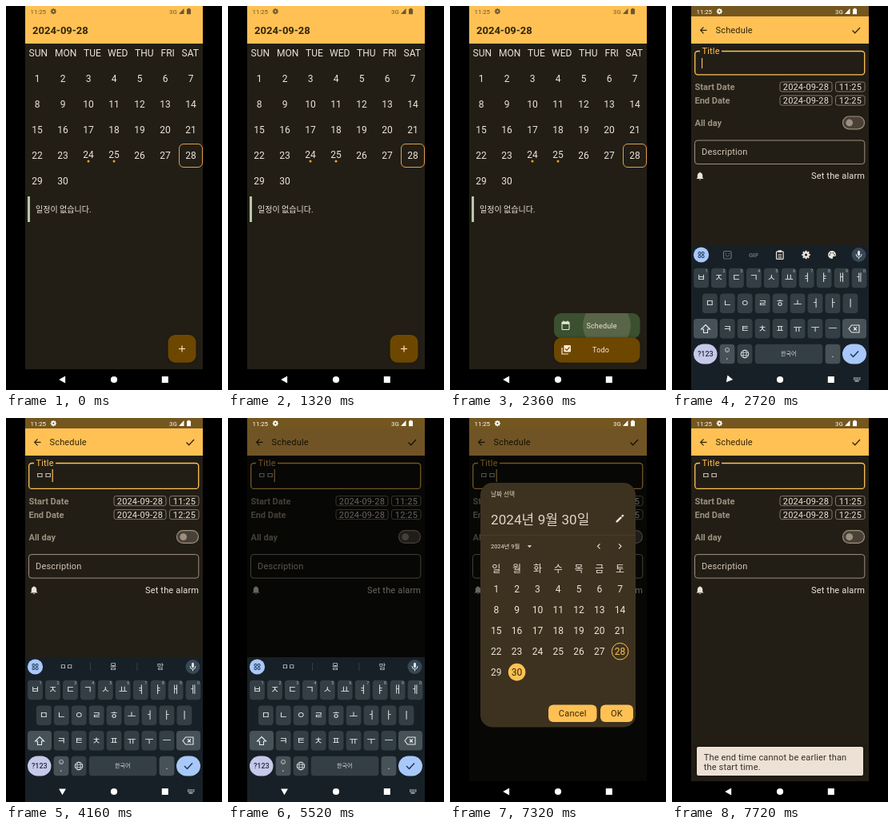
An HTML page with a canvas for the animation above (8 s loop, 270 px wide and 480 px high).

```html
<!DOCTYPE html>
<html lang="ko">
<head>
<meta charset="utf-8">
<title>Calendar</title>
<style>
html, body { margin: 0; width: 100%; height: 100%; overflow: hidden; background: #000; }
canvas { display: block; width: 270px; height: 480px; }
</style>
</head>
<body>
<canvas id="stage"></canvas>
<script>
const canvas = document.getElementById('stage');
const ctx = canvas.getContext('2d');
const dpr = window.devicePixelRatio || 1;
canvas.width = 270 * dpr;
canvas.height = 480 * dpr;

const LOOP = 8000;
const FONT = 'Roboto, "Noto Sans CJK KR", "Noto Sans CJK", sans-serif';
const AMBER = '#ffc154', INK = '#ece3da', DARK = '#33250a';
const MUTED = '#9c9080', BROWN = '#6d4700', GREEN = '#3b502e';
const KEYBED = '#172026', KEY = '#343f45', KEY_ALT = '#465158';

const clamp = v => Math.max(0, Math.min(1, v));
const lerp = (a, b, p) => a + (b - a) * p;
const span = (t, a, b) => clamp((t - a) / (b - a));
const easeOut = p => 1 - (1 - p) ** 3;
const smooth = p => p * p * (3 - 2 * p);

// y is the optical middle of the line
function text(s, x, y, size, color = INK, { align = 'left', weight = 400, ls = 0 } = {}) {
  ctx.font = `${weight} ${size}px ${FONT}`;
  ctx.letterSpacing = ls + 'px';
  ctx.textAlign = align;
  ctx.fillStyle = color;
  ctx.fillText(s, x, y + size * 0.355);
}
const mid = (s, x, y, size, color, weight) => text(s, x, y, size, color, { align: 'center', weight });
const label = (s, x, y, color, opt) => text(s, x, y, 11, color, { ls: 0.17, ...opt });

function rect(x, y, w, h, color) {
  ctx.fillStyle = color;
  ctx.fillRect(x, y, w, h);
}
function round(x, y, w, h, r, fill, stroke, lw = 1) {
  ctx.beginPath();
  ctx.roundRect(x, y, w, h, r);
  paint(fill, stroke, lw);
}
function disc(x, y, r, fill, stroke, lw = 1) {
  ctx.beginPath();
  ctx.arc(x, y, r, 0, 7);
  paint(fill, stroke, lw);
}
function paint(fill, stroke, lw) {
  if (fill) { ctx.fillStyle = fill; ctx.fill(); }
  if (stroke) { ctx.strokeStyle = stroke; ctx.lineWidth = lw; ctx.stroke(); }
}
function shape(d, x, y, fill, stroke, lw = 1.2) {
  at(x, y, () => {
    const path = new Path2D(d);
    if (fill) { ctx.fillStyle = fill; ctx.fill(path); }
    if (stroke) { ctx.strokeStyle = stroke; ctx.lineWidth = lw; ctx.stroke(path); }
  });
}
function at(x, y, draw, alpha = 1) {
  ctx.save();
  ctx.translate(x, y);
  ctx.globalAlpha *= alpha;
  draw();
  ctx.restore();
}
const faded = (alpha, draw) => { if (alpha > 0) at(0, 0, draw, alpha); };
const dim = a => rect(24, 13, 222, 441, `rgba(0,0,0,${a})`);

// page colour sinks to black faster than the rest under a scrim
function ground(shade) {
  const k = clamp(1 - 5 * shade ** 4);
  return `rgb(${34 * k},${30 * k},${22 * k})`;
}

function gear(x, y, r, color, hole) {
  for (let i = 0; i < 8; i++) {
    const a = i * Math.PI / 4;
    ctx.beginPath();
    ctx.moveTo(x, y);
    ctx.lineTo(x + Math.cos(a) * r, y + Math.sin(a) * r);
    ctx.strokeStyle = color;
    ctx.lineWidth = r * 0.42;
    ctx.stroke();
  }
  disc(x, y, r * 0.72, color);
  disc(x, y, r * 0.3, hole);
}

function statusBar(bar, color) {
  rect(24, 0, 222, 13, bar);
  text('11:25', 30.5, 7, 7.8, color);
  gear(59.3, 6.7, 3.6, color, bar);
  text('3G', 204, 7, 7.8, color);
  shape('M0 7L6.5 0V7Z', 216, 3, color);
  shape('M0 1H1.4V0H3.6V1H5V7.5H0Z', 226, 2.8, color);
}

function navBar(turn, kb) {
  rect(24, 454, 222, 26, kb > 0.05 ? KEYBED : '#000');
  at(70.5, 467, () => {
    ctx.rotate(-turn * Math.PI / 2);
    shape('M-4.3 0L3.6 -4.4V4.4Z', 0, 0, '#fff');
  });
  disc(135, 467, 4.1, '#fff');
  rect(194.8, 463, 8, 8, '#fff');
  faded(kb, () => {
    for (let i = 0; i < 8; i++) rect(227 + i % 4 * 2.3, 464.3 + (i >> 2) * 2, 1.5, 1.2, '#d5dade');
    rect(228.5, 468.3, 5, 1.2, '#d5dade');
  });
}

function home(bg) {
  rect(24, 13, 222, 441, bg);
  rect(24, 13, 222, 34, AMBER);
  text('2024-09-28', 33, 30, 13, DARK, { weight: 700 });
  const xs = [28.5, 61, 97, 127, 161, 193.5, 219.5];
  'SUN MON TUE WED THU FRI SAT'.split(' ').forEach((d, i) => text(d, xs[i], 58.5, 12));
  for (let d = 1; d <= 30; d++) {
    const x = 39 + (d - 1) % 7 * 32, y = 91 + Math.floor((d - 1) / 7) * 32;
    const busy = d === 24 || d === 25;
    mid(d, x, y - (busy ? 1 : 0), 12);
    if (busy) disc(x, y + 7, 1.5, '#f5a52d');
  }
  round(216.5, 172.5, 29, 29, 5.5, null, '#e0a048');
  rect(27, 238, 3, 32, '#b8c8a6');
  text('일정이 없습니다.', 37, 254.5, 10);
}

function fabMenu(t) {
  const p = easeOut(span(t, 1360, 1960)), rise = p ** 3;
  const left = lerp(202.5, 130, p), w = 237.5 - left;
  const top = lerp(411, 384, rise), mainTop = lerp(411, 414.5, p);
  const show = span(t, 1360, 1900);
  const glow = Math.sin(Math.PI * span(t, 1340, 2000));
  const cx = lerp(232, 189.5, p);
  if (p > 0) {
    round(left, top, w, 31.5, 9, GREEN);
    if (t > 2160) {
      ctx.save();
      ctx.beginPath();
      ctx.roundRect(left, top, w, 31.5, 9);
      ctx.clip();
      disc(196, 399, 30 * easeOut(span(t, 2140, 2400)), 'rgba(240,210,200,.16)');
      ctx.restore();
    }
    const y = lerp(428, 399.5, rise);
    faded(show, () => text('Schedule', cx, y, 9, INK, { align: 'center', ls: 0.17 }));
    const c = '#e4ecd8';
    faded(clamp(show * 2), () => {
      round(left + 10, y - 4.4, 9, 9.4, 1, null, c, 1.1);
      rect(left + 10, y - 4.6, 9, 2.8, c);
      rect(left + 11.4, y - 6, 1.2, 2, c);
      rect(left + 16.4, y - 6, 1.2, 2, c);
    });
  }
  ctx.save();
  ctx.shadowColor = 'rgba(0,0,0,.4)';
  ctx.shadowBlur = 3;
  round(left, mainTop, w, 445.7 - mainTop, 9, BROWN);
  ctx.restore();
  round(left, mainTop, w, 445.7 - mainTop, 9, `rgba(255,175,50,${0.17 * glow})`);
  faded(1 - span(t, 1340, 1480), () => {
    rect(216, 427.9, 8, 1.2, '#ffdfb0');
    rect(219.4, 424.5, 1.2, 8, '#ffdfb0');
  });
  faded(show, () => text('Todo', cx - 1 + 5 * (1 - show), 430, 9, '#ffe9cc', { align: 'center', ls: 0.17 }));
  faded(span(t, 1640, 1960), () => {
    const x = left + 10;
    shape('M0 2.5V10.5H8', x, 424.5, null, '#ffe9cc', 1.2);
    round(x + 2.4, 424, 8.6, 8.6, 1, '#ffe9cc');
    shape('M0 2L2 4L5.5 0', x + 4, 426.3, null, BROWN, 1.2);
  });
}

function schedule(typed, cursor, bg) {
  const dy = typed ? 2.6 : 0;
  rect(24, 13, 222, 441, bg);
  rect(24, 13, 222, 34, AMBER);
  shape('M8.5 4H1M4.5 0L.7 4L4.5 8', 35, 26.3, null, DARK);
  label('Schedule', 54.5, 30, DARK);
  shape('M0 4L3.2 7.2L9.5 .5', 225.5, 26.5, null, DARK, 1.3);

  round(28.7, 56.5, 212, 29.3 + dy, 3.5, null, AMBER, 1.3);
  rect(35, 55, 27, 3, bg);
  label('Title', 37.5, 56, AMBER);
  text('ㅁ'.repeat(typed), 37.3, 72.5, 11);
  if (cursor) {
    if (typed) rect(37 + typed * 10.3, 64, 1.2, 16, AMBER);
    else rect(37, 65, 1.1, 13, AMBER);
  }

  at(0, dy, () => {
    const bold = { weight: 700, ls: 0 };
    [['Start Date', '11:25', 101], ['End Date', '12:25', 118]].forEach(([name, time, y]) => {
      label(name, 28.5, y, MUTED, bold);
      round(135, y - 6, 65, 12, 2.5, null, '#8d8273', 0.9);
      round(204.5, y - 6, 36.5, 12, 2.5, null, '#8d8273', 0.9);
      label('2024-09-28', 138.8, y, INK);
      label(time, 208.8, y, INK);
    });
    label('All day', 28.5, 146, MUTED, bold);
    round(213.5, 138, 27, 15.8, 8, '#4a4136', MUTED, 1.2);
    disc(221.7, 146, 4.4, MUTED);
    round(28.5, 168, 212.3, 29.5, 3.5, null, '#9c8f80', 1);
    label('Description', 37, 182.5, '#d3c5b5');
    shape('M0 8.5L1.3 7V4Q1.4 1.4 3.6 .9Q4.5 -.8 5.4 .9Q7.6 1.4 7.7 4V7L9 8.5ZM3.3 9.2H5.7Q4.5 11 3.3 9.2Z', 30.5, 207.5, INK);
    label('Set the alarm', 174, 212.5);
  });
}

function key(c, x, y, w, color = KEY) {
  round(x - w / 2, y - 12.3, w, 24.6, 4, color);
  if (c) mid(c, x, y, 12, '#e6eaed');
}

function toolbar(typed) {
  disc(36.5, 311, 9.6, '#a9c8fa');
  for (let i = 0; i < 4; i++) {
    round(33 + i % 2 * 4.2, 307.5 + (i >> 1) * 4.2, 2.8, 2.8, 0.8, null, '#17304f', 1);
  }
  disc(233.5, 311, 9, '#384754');
  round(232, 305.8, 3, 6.5, 1.5, '#dbe4ec');
  shape('M0 0Q0 4 3.5 4Q7 4 7 0M3.5 4V6.3', 230, 310, null, '#dbe4ec', 1);
  if (typed) {
    const words = typed === 1 ? ['ㅁ', '뭐', '무'] : ['ㅁㅁ', '몸', '맘'];
    words.forEach((s, i) => mid(s, 75.5 + i * 58.7, 311, 9, '#dfe5e9'));
    [105, 163.5].forEach(x => rect(x, 306, 0.8, 10, '#3c474e'));
    return;
  }
  const grey = '#65727a';
  round(64.5, 306.5, 9.5, 9.5, 1.5, null, grey, 1.2);
  shape('M0 0Q2.5 3 5 0', 66.8, 311.5, null, grey, 1);
  disc(67.5, 309.5, 0.8, grey);
  disc(71.3, 309.5, 0.8, grey);
  mid('GIF', 102, 311, 8, grey, 700);
  round(130.5, 306.8, 8.6, 9.6, 1, null, INK, 1.2);
  rect(132.6, 305.3, 4.4, 2.6, INK);
  [310, 312, 314].forEach(y => rect(132.5, y, 4.6, 0.9, INK));
  gear(167.5, 311, 5.2, INK, KEYBED);
  shape('M5 0A5 5 0 1 0 5 10Q6.5 10 6 8.3Q5.8 7 7.2 7H8.5Q10 7 10 5A5 5 0 0 0 5 0Z', 195, 306, INK);
  [[197, 311], [198.3, 308.7], [201.5, 308.7], [203.2, 311]].forEach(([x, y]) => disc(x, y, 0.8, KEYBED));
}

function keyboard(typed, pressed) {
  rect(24, 299, 222, 181, KEYBED);
  toolbar(typed);
  [...'ㅂㅈㄷㄱㅅㅛㅕㅑㅐㅔ'].forEach((c, i) => {
    const x = 36.5 + i * 21.95;
    key(c, x, 340, 18.8);
    mid((i + 1) % 10, x + 6.4, 331.5, 5.2, '#b5bec4');
  });
  [...'ㅁㄴㅇㄹㅎㅗㅓㅏㅣ'].forEach((c, i) => {
    key(c, 47.3 + i * 21.95, 371.7, 18.8, pressed && !i ? '#5c6a72' : KEY);
  });
  [...'ㅋㅌㅊㅍㅠㅜㅡ'].forEach((c, i) => key(c, 69.2 + i * 21.95, 403.3, 18.8));
  key('', 42, 403.3, 30, KEY_ALT);
  shape('M5.5 0L11 5.5H8V10H3V5.5H0Z', 36.5, 398.5, null, '#e6eaed', 1.1);
  key('', 228, 403.3, 30, KEY_ALT);
  shape('M3.5 0H13V9H3.5L0 4.5ZM6 2.5L10 6.5M10 2.5L6 6.5', 221, 399, null, '#e6eaed', 1.1);

  round(27, 422.5, 29.5, 25, 12.5, '#c6c9e8');
  mid('?123', 41.8, 435, 9, '#252b3d', 500);
  key('', 69, 435, 18.8, KEY_ALT);
  disc(69, 430, 2.6, null, '#c4ccd1', 0.8);
  shape('M0 0Q1.3 1.5 2.6 0', 67.7, 430.5, null, '#c4ccd1', 0.6);
  mid(',', 69, 437.5, 9, '#e6eaed');
  key('', 91, 435, 18.8);
  disc(91, 435, 4.8, null, '#e6eaed', 1);
  ctx.beginPath();
  ctx.ellipse(91, 435, 2.1, 4.8, 0, 0, 7);
  paint(null, '#e6eaed', 0.8);
  shape('M0 0H9M0 3.4H9', 86.5, 433.3, null, '#e6eaed', 0.7);
  key('', 146, 435, 84.5);
  mid('한국어', 145.7, 435, 7, '#d5dbdf');
  key('.', 201, 435, 18.8, KEY_ALT);
  round(213, 422.5, 30, 25, 12.5, '#a9c8fa');
  shape('M0 4L3.5 7.5L10 .5', 223, 431, null, '#17304f', 1.4);
}

function dialog(t) {
  const picked = t < 6560 ? 28 : 30;
  round(38, 81, 194, 305.5, 15, '#3d321f');
  text('날짜 선택', 51, 95.5, 7.7, '#e0d3c2');
  text(`2024년 9월 ${picked}일`, 51, 127, 17, '#e0d6c9', { ls: 0.1 });
  shape('M0 8.2V10H1.8L7.6 4.2L5.8 2.4ZM6.5 1.7L8.3 3.5L9.7 2.1Q10 1.7 9.7 1.3L8.7 .3Q8.3 0 7.9 .3Z', 207.5, 120.5, INK);
  rect(38, 146, 194, 0.7, '#4c412f');
  text('2024년 9월', 51, 160.5, 7.4, INK);
  shape('M0 0H5.4L2.7 2.7Z', 96.7, 159.2, INK);
  shape('M3 0L0 3L3 6', 184.5, 157.3, null, INK, 1.1);
  shape('M0 0L3 3L0 6', 211, 157.3, null, INK, 1.1);
  const cellX = i => 57.8 + i * 25.8;
  [...'일월화수목금토'].forEach((c, i) => mid(c, cellX(i), 189, 12));
  for (let d = 1; d <= 30; d++) {
    const x = cellX((d - 1) % 7), y = 214 + Math.floor((d - 1) / 7) * 25.9;
    let color = INK;
    if (d === picked) {
      disc(x, y, 10.8, AMBER);
      color = DARK;
    } else if (d === 28) {
      disc(x, y, 10.3, null, AMBER);
      color = AMBER;
    }
    if (d === 30 && t > 6520) {
      const a = 0.16 * (1 - span(t, 7000, 7320));
      disc(x, y, 10.8 * easeOut(span(t, 6520, 6840)), `rgba(70,45,0,${a})`);
    }
    mid(d, x, y, 12, color);
  }
  [['Cancel', 123, 60.5], ['OK', 188, 41]].forEach(([s, x, w]) => {
    round(x, 358.5, w, 21.5, 6, AMBER);
    text(s, x + w / 2, 369.3, 11, DARK, { align: 'center', ls: 0.25 });
  });
  if (t > 7500) round(188, 358.5, 41, 21.5, 6, 'rgba(70,45,0,.14)');
}

function snackbar(p) {
  faded(p, () => {
    const h = 36 * lerp(0.5, 1, p);
    ctx.save();
    ctx.shadowColor = 'rgba(0,0,0,.5)';
    ctx.shadowBlur = 4;
    round(31, 447 - h, 208, h, 2, '#ede1d5');
    ctx.restore();
    label('The end time cannot be earlier than', 39.7, 447 - h + 12.7, '#352f28');
    label('the start time.', 39.7, 447 - h + 25.3, '#352f28');
  });
}

function cursorOn(t) {
  if (t < 3400) return true;
  if (t < 3880) return false;
  if (t < 4640) return true;
  return Math.floor((t - 4640) / 480) % 2 === 1 && t < 7520;
}

function frame(t) {
  ctx.setTransform(dpr, 0, 0, dpr, 0, 0);
  ctx.globalAlpha = 1;
  rect(0, 0, 270, 480, '#000');
  ctx.save();
  ctx.beginPath();
  ctx.rect(24, 0, 222, 480);
  ctx.clip();

  const page = smooth(span(t, 2380, 2600));
  const typed = t < 3880 ? 0 : t < 4080 ? 1 : 2;
  const pressed = (t >= 3880 && t < 3960) || (t >= 4080 && t < 4160);
  const kb = easeOut(span(t, 2460, 2700)) * (1 - smooth(span(t, 5660, 5920)));
  const turn = smooth(span(t, 2580, 2840)) * (1 - smooth(span(t, 5700, 6080)));

  if (page < 1) {
    const shade = 0.68 * span(t, 1340, 1630) * (1 - span(t, 2140, 2340));
    home(ground(shade));
    dim(shade);
    fabMenu(t);
  }
  if (page > 0) {
    const out = 1 - span(t, 7520, 7680);
    const shade = 0.56 * span(t, 5420, 5520) * out;
    at(0, 30 * (1 - page), () => schedule(typed, cursorOn(t), ground(shade)), page);
    dim(shade);
    faded(smooth(span(t, 5540, 5720)) * out, () => dialog(t));
    snackbar(easeOut(span(t, 7560, 7720)));
  }
  if (page > 0.5) statusBar('#735620', '#fff');
  else statusBar(AMBER, '#6a5530');
  navBar(turn, 0);
  if (kb > 0) {
    at(0, 181 * (1 - kb), () => keyboard(typed, pressed));
    navBar(turn, kb);
  }
  ctx.restore();
}

const start = performance.now();
function tick() {
  frame((performance.now() - start) % LOOP);
  requestAnimationFrame(tick);
}
tick();
</script>
</body>
</html>
```
